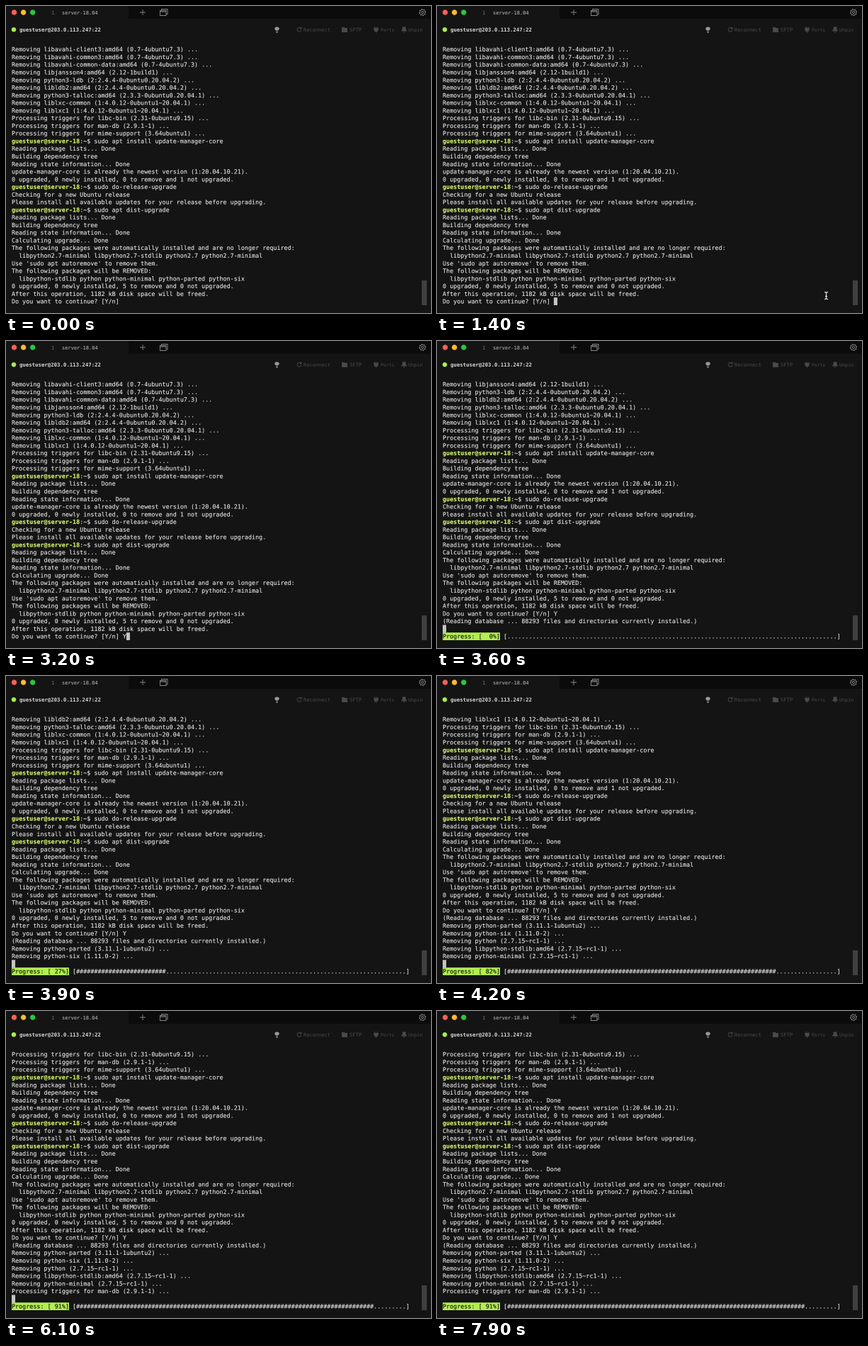
Write an HTML page with a canvas that moves like this. It is 600 px wide and 433 px high and loops after 8000 ms.

```html
<!DOCTYPE html>
<html lang="en">
<head>
<meta charset="utf-8">
<title>Terminal upgrade</title>
<style>
html, body { margin: 0; width: 100%; height: 100%; overflow: hidden; background: #141414; }
canvas { display: block; width: 600px; height: 433px; }
</style>
</head>
<body>
<canvas id="stage" width="1200" height="866"></canvas>
<script>
const ctx = document.getElementById('stage').getContext('2d');
ctx.scale(2, 2); // double resolution gives soft, fractional text positions
const LOOP = 8000, BLINK = 600;
const LEFT = 8, TOP = 56.2, CELL = 5.06, ROW = 10.77, LAST_ROW = 33, BAR_CELLS = 92;
const FONT = '"DejaVu Sans Mono", monospace';
const TEXT = '#e6e6e6', LIME = '#d2f86c', BAR = '#b3ee50', DIM = '#4a4a4a';

const PROMPT = 'guestuser@server-18';
const QUESTION = 'Do you want to continue? [Y/n] ';
const history = `Removing libavahi-client3:amd64 (0.7-4ubuntu7.3) ...
Removing libavahi-common3:amd64 (0.7-4ubuntu7.3) ...
Removing libavahi-common-data:amd64 (0.7-4ubuntu7.3) ...
Removing libjansson4:amd64 (2.12-1build1) ...
Removing python3-ldb (2:2.4.4-0ubuntu0.20.04.2) ...
Removing libldb2:amd64 (2:2.4.4-0ubuntu0.20.04.2) ...
Removing python3-talloc:amd64 (2.3.3-0ubuntu0.20.04.1) ...
Removing liblxc-common (1:4.0.12-0ubuntu1~20.04.1) ...
Removing liblxc1 (1:4.0.12-0ubuntu1~20.04.1) ...
Processing triggers for libc-bin (2.31-0ubuntu9.15) ...
Processing triggers for man-db (2.9.1-1) ...
Processing triggers for mime-support (3.64ubuntu1) ...
$ sudo apt install update-manager-core
Reading package lists... Done
Building dependency tree
Reading state information... Done
update-manager-core is already the newest version (1:20.04.10.21).
0 upgraded, 0 newly installed, 0 to remove and 1 not upgraded.
$ sudo do-release-upgrade
Checking for a new Ubuntu release
Please install all available updates for your release before upgrading.
$ sudo apt dist-upgrade
Reading package lists... Done
Building dependency tree
Reading state information... Done
Calculating upgrade... Done
The following packages were automatically installed and are no longer required:
  libpython2.7-minimal libpython2.7-stdlib python2.7 python2.7-minimal
Use 'sudo apt autoremove' to remove them.
The following packages will be REMOVED:
  libpython-stdlib python python-minimal python-parted python-six
0 upgraded, 0 newly installed, 5 to remove and 0 not upgraded.
After this operation, 1182 kB disk space will be freed.`.split('\n');

// Output after the answer: [time, line, finished steps of 11]
const output = [
  [3500, '(Reading database ... 88293 files and directories currently installed.)', 0],
  [3650, 'Removing python-parted (3.11.1-1ubuntu2) ...', 1],
  [3800, 'Removing python-six (1.11.0-2) ...', 3],
  [3980, 'Removing python (2.7.15~rc1-1) ...', 5],
  [4080, 'Removing libpython-stdlib:amd64 (2.7.15~rc1-1) ...', 7],
  [4180, 'Removing python-minimal (2.7.15~rc1-1) ...', 9],
  [4280, 'Processing triggers for man-db (2.9.1-1) ...', 10],
];
const TYPED = 2900, ENTERED = 3400, SETTLED = 4450, FIRST_BLINK = 150;

function setFont(size, weight = '') {
  ctx.font = `${weight} ${size}px ${FONT}`;
  ctx.textRendering = 'geometricPrecision';
}

function label(text, x, y, size, color, weight) {
  setFont(size, weight);
  ctx.fillStyle = color;
  ctx.fillText(text, x, y);
}

function rect(x, y, w, h, color) {
  ctx.fillStyle = color;
  ctx.fillRect(x, y, w, h);
}

function dot(x, y, r, color) {
  ctx.fillStyle = color;
  ctx.beginPath();
  ctx.arc(x, y, r, 0, 7);
  ctx.fill();
}

function stroke(path, color, width = 0.9) {
  ctx.strokeStyle = color;
  ctx.lineWidth = width;
  ctx.stroke(new Path2D(path));
}

function solid(path, color) {
  ctx.fillStyle = color;
  ctx.fill(new Path2D(path));
  stroke(path, color);
}

// Terminal text sits on a fixed grid of cells; a hairline outline thickens it.
function print(text, col, row, color = TEXT, weight = '') {
  setFont(8.4, weight);
  ctx.fillStyle = ctx.strokeStyle = color;
  ctx.lineWidth = 0.12;
  const y = TOP + row * ROW + 8;
  [...text].forEach((char, i) => {
    if (char === ' ') return;
    const x = LEFT + (col + i) * CELL;
    ctx.fillText(char, x, y);
    ctx.strokeText(char, x, y);
  });
}

function printLine(line, row) {
  if (!line.startsWith('$ ')) return print(line, 0, row);
  const end = PROMPT.length;
  print(PROMPT, 0, row, LIME, 'bold');
  print(':', end, row);
  print('~', end + 1, row, '#cfd3dc', 'bold');
  print(line, end + 2, row);
}

function drawChrome() {
  rect(0, 0, 600, 433, '#141414');
  rect(173, 0, 427, 18, '#0b0b0b');
  ['#ff5f57', '#febc2e', '#28c840'].forEach((color, i) => dot(11.5 + i * 13.1, 9, 3.7, color));
  label('1', 64, 11.8, 7, '#777');
  label('server-18.04', 79, 11.8, 7, '#c4c4c4');
  stroke('M189 9H197M193 5V13', '#888');
  stroke('M217.5 6.5H226V13.5H217.5ZM217.5 8H226M219.5 6V4.5H228V11.5H226.5', '#888');
  stroke('M586.5 9A1.5 1.5 0 1 0 589.5 9A1.5 1.5 0 1 0 586.5 9', '#777');
  stroke('M584.2 9A3.8 3.8 0 1 0 591.8 9A3.8 3.8 0 1 0 584.2 9', '#777');
  ctx.setLineDash([1.8, 1.8]);
  stroke('M583.4 9A4.6 4.6 0 1 0 592.6 9A4.6 4.6 0 1 0 583.4 9', '#777');
  ctx.setLineDash([]);

  dot(11, 33.3, 3.3, '#a4ec50');
  label('guestuser@203.0.113.247:22', 19, 36, 7.35, '#d8d8d8', 'bold');
  solid('M381 34C378.5 32 380 30 382.5 30S386.5 32 384 34Z', '#999');
  stroke('M381 36H384M381.5 37.5H383.5', '#999');
  stroke('M416.5 31.5A3 3 0 1 0 417 34M417 29.5V32H414.5', DIM);
  label('Reconnect', 420, 36, 7, DIM);
  solid('M474.5 36.5V30.5H477.5L478.5 31.5H481.5V36.5Z', DIM);
  label('SFTP', 485, 36, 7.2, DIM);
  solid('M519.5 31.5H525.5L524.5 35.5H520.5Z', DIM);
  stroke('M521 31V29M524 31V29M522.5 36V38', DIM);
  label('Ports', 529, 36, 6.4, DIM);
  solid('M560 30H564V33L565.5 35H558.5L560 33Z', DIM);
  stroke('M562 35V38', DIM);
  label('Unpin', 568, 36, 6.7, DIM);
  rect(587, 387, 7, 35, '#404040');
}

function drawProgress(steps) {
  const ratio = steps / 11;
  const percent = String(Math.round(ratio * 100)).padStart(3);
  const filled = Math.floor(ratio * BAR_CELLS);
  rect(LEFT, TOP + LAST_ROW * ROW - 0.4, 16 * CELL, ROW, BAR);
  print(`Progress: [${percent}%]`, 0, LAST_ROW, '#101010');
  print('[' + '#'.repeat(filled) + '.'.repeat(BAR_CELLS - filled) + ']', 17, LAST_ROW);
}

function cursorVisible(t) {
  if (t >= TYPED && t < SETTLED) return true;
  const start = t < TYPED ? FIRST_BLINK : SETTLED;
  return t >= start && Math.floor((t - start) / BLINK) % 2 === 0;
}

function drawPointer(t) {
  if (t < 500 || t >= TYPED) return;
  const away = (1 - Math.min(1, (t - 500) / 400)) ** 2;
  ctx.save();
  ctx.translate(549.5 + 50 * away, 408.5 + 24 * away);
  const beam = 'M-2.5 -5Q0 -5 0 -3.5Q0 -5 2.5 -5M0 -3.5V3.5M-2.5 5Q0 5 0 3.5Q0 5 2.5 5M-1.5 1H1.5';
  stroke(beam, '#e4e4e4', 1.2);
  ctx.restore();
}

function draw(t) {
  drawChrome();
  const done = output.filter(([time]) => t >= time);
  const answer = QUESTION + (t >= TYPED ? 'Y' : '');
  const lines = [...history, answer, ...done.map(([, line]) => line)];
  const cursorLine = t >= ENTERED ? lines.length : lines.length - 1;
  const bottom = done.length ? LAST_ROW - 1 : LAST_ROW;
  const scroll = Math.max(0, cursorLine - bottom);

  lines.slice(scroll).forEach(printLine);
  if (cursorVisible(t)) {
    const col = t >= ENTERED ? 0 : answer.length;
    rect(LEFT + col * CELL, TOP + (cursorLine - scroll) * ROW - 0.4, CELL, ROW, '#c4c4c4');
  }
  if (done.length) drawProgress(done[done.length - 1][2]);
  drawPointer(t);
}

const start = performance.now();
function frame() {
  draw((performance.now() - start) % LOOP);
  requestAnimationFrame(frame);
}
frame();
</script>
</body>
</html>
```
